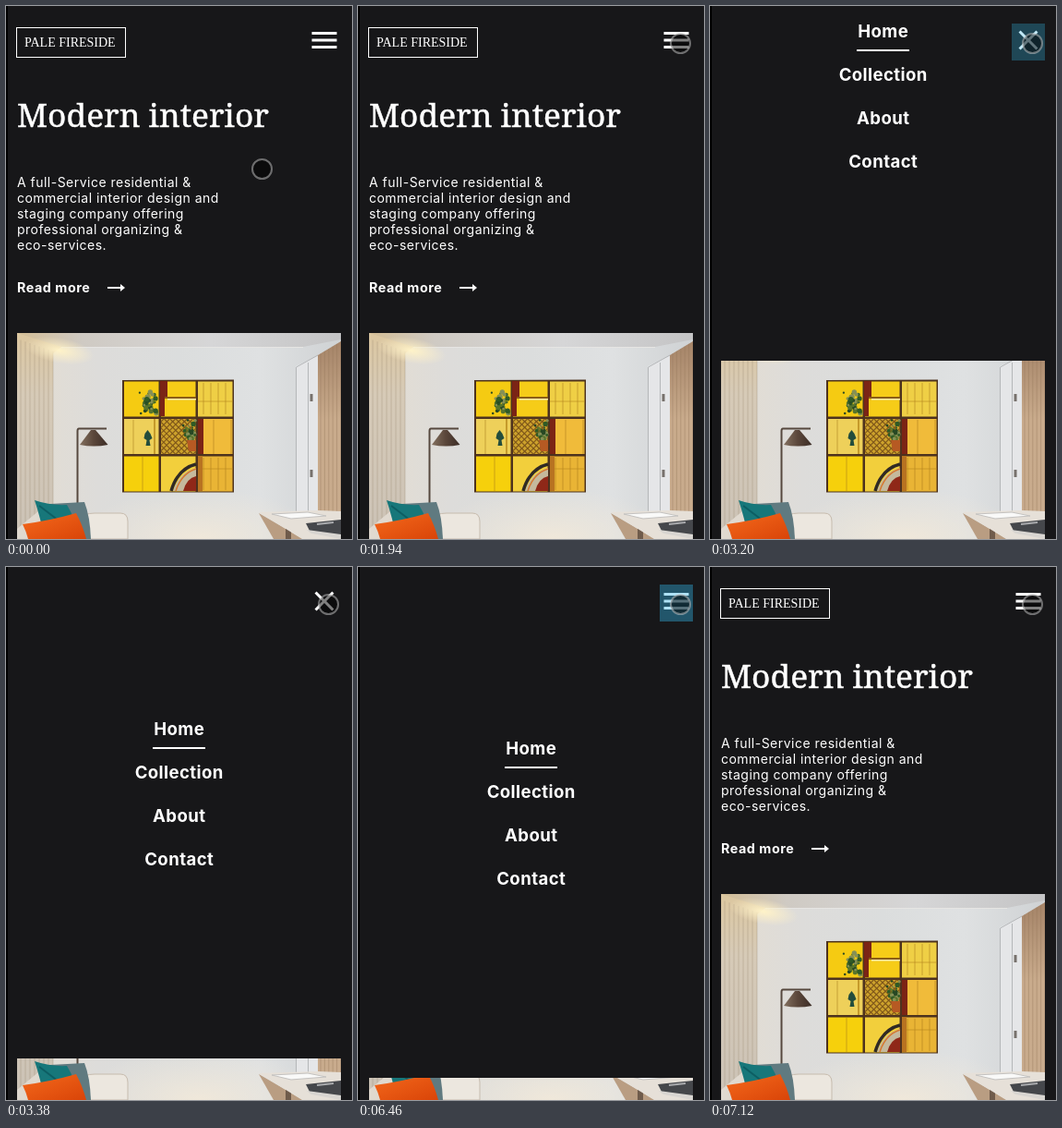
Write an HTML page that moves like this. It is 375 px wide and 577 px high and loops after 8000 ms.

```html
<!DOCTYPE html>
<html lang="en">
<head>
<meta charset="utf-8">
<title>Interior landing page</title>
<style>
  html, body { margin: 0; width: 100%; height: 100%; overflow: hidden; background: #171719; }
  svg { display: block; position: absolute; left: 0; top: 0; }
  text { fill: #fff; font-family: Inter, "Open Sans", sans-serif; }
  .logo { font: 14px "Liberation Serif", serif; }
  .title { font: 35.3px "Noto Serif", serif; stroke: #fff; stroke-width: .5px; }
  .copy { font-size: 14px; letter-spacing: .48px; }
  .more { font-size: 14.3px; font-weight: 700; letter-spacing: .55px; }
  .link { font-size: 18.6px; font-weight: 700; letter-spacing: .4px; text-anchor: middle; }
</style>
</head>
<body>
<svg width="375" height="577" viewBox="0 0 375 577">
  <defs>
    <clipPath id="photoClip"><rect x="12" y="354" width="351" height="223"/></clipPath>
    <linearGradient id="wall">
      <stop offset="0" stop-color="#e4ddd1"/><stop offset=".25" stop-color="#dddcda"/>
      <stop offset=".5" stop-color="#dbdddd"/><stop offset=".75" stop-color="#dfe1e2"/>
      <stop offset="1" stop-color="#cfd2d4"/>
    </linearGradient>
    <linearGradient id="ceiling">
      <stop offset="0" stop-color="#d3bd95"/><stop offset=".2" stop-color="#cfcac3"/>
      <stop offset=".6" stop-color="#d6d6d7"/><stop offset="1" stop-color="#c4c4c5"/>
    </linearGradient>
    <linearGradient id="curtain" x2="0" y2="1">
      <stop offset="0" stop-color="#dcc7a0"/><stop offset=".3" stop-color="#d6cab7"/>
      <stop offset="1" stop-color="#cbc2b6"/>
    </linearGradient>
    <linearGradient id="wood" x2="0" y2="1">
      <stop offset="0" stop-color="#a58468"/><stop offset=".4" stop-color="#c9ab8c"/>
      <stop offset="1" stop-color="#c8ab8d"/>
    </linearGradient>
    <linearGradient id="orange" y2="1">
      <stop offset="0" stop-color="#f4691c"/><stop offset="1" stop-color="#d94408"/>
    </linearGradient>
    <linearGradient id="shade">
      <stop offset="0" stop-color="#83705f"/><stop offset=".5" stop-color="#5a463a"/>
      <stop offset="1" stop-color="#3c2d26"/>
    </linearGradient>
    <radialGradient id="glow">
      <stop offset="0" stop-color="#fff3c8"/><stop offset="1" stop-color="#fff0c8" stop-opacity="0"/>
    </radialGradient>
    <radialGradient id="warm">
      <stop offset="0" stop-color="#f0e8da"/><stop offset="1" stop-color="#f0e8da" stop-opacity="0"/>
    </radialGradient>
  </defs>

  <rect width="375" height="577" fill="#171719"/>

  <rect x="11.5" y="23.5" width="118" height="32" fill="none" stroke="#fff"/>
  <text class="logo" x="20" y="44.3">PALE FIRESIDE</text>
  <text class="title" x="12" y="131">Modern interior</text>
  <g id="copy"></g>
  <text class="more" x="12" y="310">Read more</text>
  <path d="M110 304h14v-3l5 4l-5 4v-3h-14z" fill="#fff"/>

  <g clip-path="url(#photoClip)">
    <rect x="12" y="354" width="351" height="223" fill="url(#wall)"/>
    <ellipse cx="210" cy="577" rx="130" ry="55" fill="url(#warm)"/>
    <path d="M12 354H363V361L322 369H60L12 360Z" fill="url(#ceiling)"/>
    <path d="M60 369.500H322" stroke="#e6e5e3"/>
    <path d="M12 354L60 369L51 376V577H12Z" fill="url(#curtain)"/>
    <g id="folds" stroke="#94866f" stroke-opacity=".35"></g>
    <ellipse cx="58" cy="373" rx="38" ry="14" fill="url(#glow)" transform="rotate(10 58 373)"/>

    <path d="M314 390L341 377V577H314Z" fill="#e5e6e8"/>
    <path d="M314.500 577V391L338 378M327.500 577V386" fill="none" stroke="#b4b6b8"/>
    <path d="M331 420v8M331 502v8" stroke="#77716c" stroke-width="3"/>
    <path d="M338 378L363 363V577H338Z" fill="url(#wood)"/>
    <g id="planks" stroke="#94755a" stroke-opacity=".4"></g>

    <g id="art">
      <path d="M126 405L247 404.500V526.500H126Z" fill="#4d321e"/>
      <g id="cells"></g>
      <path d="M167 406h8v19h-8zM208 447h6v38h-6zM167 406h5v38h-5z" fill="#7b2415"/>
      <path d="M172 423h34v2h-34z" fill="#8a5d16"/>
      <path d="M175 425h31v1.500h-31z" fill="#f7ebb0"/>
      <g id="panels" fill="none" stroke="#a87a1c" stroke-opacity=".55"></g>
      <path d="M208 428h38M208 501h38" stroke="#b5831d" stroke-opacity=".6"/>
      <path d="M153.500 459l3 4l2 5l-3 2l1 6h-5l1-6l-3-2l1-5z" fill="#234d3c"/>
      <path d="M161 447v38" stroke="#c59a2b" stroke-width="2"/>
      <g id="lattice" stroke="#81591a" stroke-width="1.100"></g>
      <g id="leaves"></g>
      <path d="M196 470h10v12h-8z" fill="#b65a23"/>
      <path d="M181 525Q188 505 206 500V525Z" fill="#c5b99d"/>
      <path d="M192 525Q196 511 206 509V525Z" fill="#8f2818"/>
      <path d="M179 525Q186 501 206 496" fill="none" stroke="#302a25" stroke-width="3.500"/>
      <path d="M184 525Q190 506 206 501" fill="none" stroke="#d5782f" stroke-width="1.500"/>
      <path d="M208 487h5v38h-5z" fill="#b87321"/>
    </g>

    <path d="M109 457.500H79Q77.500 457.500 77.500 460V545" fill="none" stroke="#56483e" stroke-width="2"/>
    <path d="M92 459H97L110.500 475Q95 478 80 475Z" fill="url(#shade)"/>

    <path d="M80 556Q84 549 96 549H124Q132 549 132 558V577H80Z" fill="#ece7df" stroke="#c6bbad"/>
    <path d="M12 566L35 547L80 553L92 577H12Z" fill="#e0d9cf"/>
    <path d="M48 539L85 537Q91 552 92 577H54Z" fill="#607a80"/>
    <path d="M31 535Q48 541 66 540Q76 556 79 577H42Q37 553 31 535Z" fill="#17777a"/>
    <path d="M36 541L61 560L74 568" fill="none" stroke="#0d5e63" stroke-width="2"/>
    <path d="M18 561Q48 557 76 549Q83 562 87 577H24Q22 569 18 561Z" fill="url(#orange)"/>

    <path d="M274 549L322 577H290Z" fill="#b99d82"/>
    <path d="M303 563l6 4v10h-6z" fill="#6f5b4b"/>
    <path d="M274 548L338 546L363 547V577H321Z" fill="#e6e0d8"/>
    <path d="M288 550L327 548L347 552L309 555Z" fill="#f9f9f8" stroke="#c4c2c0"/>
    <path d="M325 560L363 556V573L329 568Z" fill="#45474b"/>
    <path d="M326 567L363 572V577L331 571Z" fill="#d8d5d1"/>
    <path d="M337 561L355 559" stroke="#a9aaad" stroke-width="2"/>
  </g>

  <g id="menu">
    <rect x="2" width="373" height="577" fill="#171719"/>
    <g id="links"></g>
    <rect x="159" y="240" width="57" height="2" fill="#fff"/>
  </g>

  <g transform="translate(327 19) scale(1.5)" fill="#fff">
    <path id="bars" d="M3 18h18v-2H3v2zm0-5h18v-2H3v2zm0-7v2h18V6H3z"/>
    <path id="cross" d="M19 6.410L17.590 5 12 10.590 6.410 5 5 6.410 10.590 12 5 17.590 6.410 19 12 13.410 17.590 19 19 17.590 13.410 12z"/>
  </g>
  <rect id="tap" x="327" y="19" width="36" height="40" fill="#33b5e5"/>
  <rect width="2" height="577" fill="#000"/>
  <g id="cursor">
    <circle r="11" fill="#000" fill-opacity=".5"/>
    <circle r="10.500" fill="none" stroke="#fff" stroke-opacity=".4" stroke-width="2"/>
  </g>
</svg>
<script>
const $ = id => document.getElementById(id);
const NS = 'http://www.w3.org/2000/svg';

function add(parent, tag, attrs, text) {
  const el = document.createElementNS(NS, tag);
  for (const k in attrs) el.setAttribute(k, attrs[k]);
  if (text) el.textContent = text;
  $(parent).append(el);
}
const path = (parent, d) => add(parent, 'path', { d });

['A full-Service residential &', 'commercial interior design and', 'staging company offering',
  'professional organizing &', 'eco-services.'].forEach((line, i) =>
  add('copy', 'text', { class: 'copy', x: 12, y: 195.5 + i * 17.07 }, line));

['Home', 'Collection', 'About', 'Contact'].forEach((name, i) =>
  add('links', 'text', { class: 'link', x: 187.7, y: 227 + i * 47 }, name));

for (let x = 16; x < 52; x += 5) path('folds', `M${x} ${356 + x * .35}V577`);
for (let x = 341; x < 363; x += 4.4) path('planks', `M${x} ${581 - x * .6}V577`);

const tones = ['#f5cb12', '#f6cc18', '#efcf45', '#eed05a', '#cda22c', '#f0bb3a', '#f6d00c', '#f2cf3c', '#e9b435'];
tones.forEach((fill, i) => add('cells', 'rect', {
  x: 128 + i % 3 * 40, y: 406.5 + Math.floor(i / 3) * 40.5, width: 37.5, height: 38, fill
}));
for (let x = 214; x < 246; x += 8) path('panels', `M${x} 408V442M${x} 489V524`);
path('panels', 'M138 448V485M225 448V485M244 448V485M148 488V525');
for (let i = 0; i < 6; i++) {
  const a = 3 + i * 6.3;
  path('lattice', `M${168 + a} 447L168 ${447 + a}M${206 - a} 485L206 ${485 - a}` +
    `M${168 + a} 485L168 ${485 - a}M${206 - a} 447L206 ${447 + a}`);
}

let seed = 7;
const rand = () => (seed = seed * 16807 % 2147483647) / 2147483647;
function bush(x, y, w, h, n) {
  for (let i = 0; i < n; i++) add('leaves', 'circle', {
    cx: x + (rand() + rand() - 1) * w, cy: y + (rand() + rand() - 1) * h,
    r: 1 + rand() * 1.8, fill: ['#2f5a26', '#59742c', '#274824', '#869056'][i % 4]
  });
}
bush(154, 430, 11, 14, 48);
bush(199, 461, 7, 14, 32);

const LOOP = 8000, TICK = 20, SLIDE = 655, OPEN = 2960, CLOSE = 6460;
const stops = [
  [0, 277.5, 176.5], [840, 333.5, 120.5], [1120, 336.5, 69.5],
  [1380, 337.5, 53.5], [1680, 345.5, 43.5], [1940, 349.5, 40.5]
];
const clamp = v => Math.min(1, Math.max(0, v));
const bez = (a, b, s) => 3 * a * s * (1 - s) ** 2 + 3 * b * s * s * (1 - s) + s ** 3;

// CSS "ease", solved by bisection
function ease(x) {
  if (x <= 0 || x >= 1) return clamp(x);
  let lo = 0, hi = 1;
  for (let i = 0; i < 24; i++) {
    const mid = (lo + hi) / 2;
    if (bez(.25, .25, mid) < x) lo = mid; else hi = mid;
  }
  return bez(.1, 1, lo);
}

// The slide pauses briefly at two moments
const hold = t => [3380, CLOSE].find(h => t >= h && t < h + 100) ?? t;

function shown(t) {
  if (t < OPEN) return 0;
  const h = hold(t);
  return t < CLOSE ? ease((h - 2946) / SLIDE) : 1 - ease((h - 6422) / SLIDE);
}

function tapAlpha(t) {
  if (t >= 2820 && t < CLOSE) return .4 * clamp((3350 - t) / 200);
  return t >= CLOSE ? .4 * clamp((6850 - t) / 200) : 0;
}

function draw(t) {
  const [, x, y] = stops.findLast(s => s[0] <= t);
  $('cursor').setAttribute('transform', `translate(${x} ${y})`);
  $('menu').setAttribute('transform', `translate(0 ${Math.round(577 * (shown(t) - 1))})`);
  const open = t >= OPEN && t < CLOSE;
  $('bars').style.display = open ? 'none' : '';
  $('cross').style.display = open ? '' : 'none';
  $('tap').setAttribute('opacity', tapAlpha(t));
}

const start = performance.now();
function tick() {
  const t = (performance.now() - start) % LOOP;
  draw(Math.floor(t / TICK) * TICK);
  requestAnimationFrame(tick);
}
tick();
</script>
</body>
</html>
```
